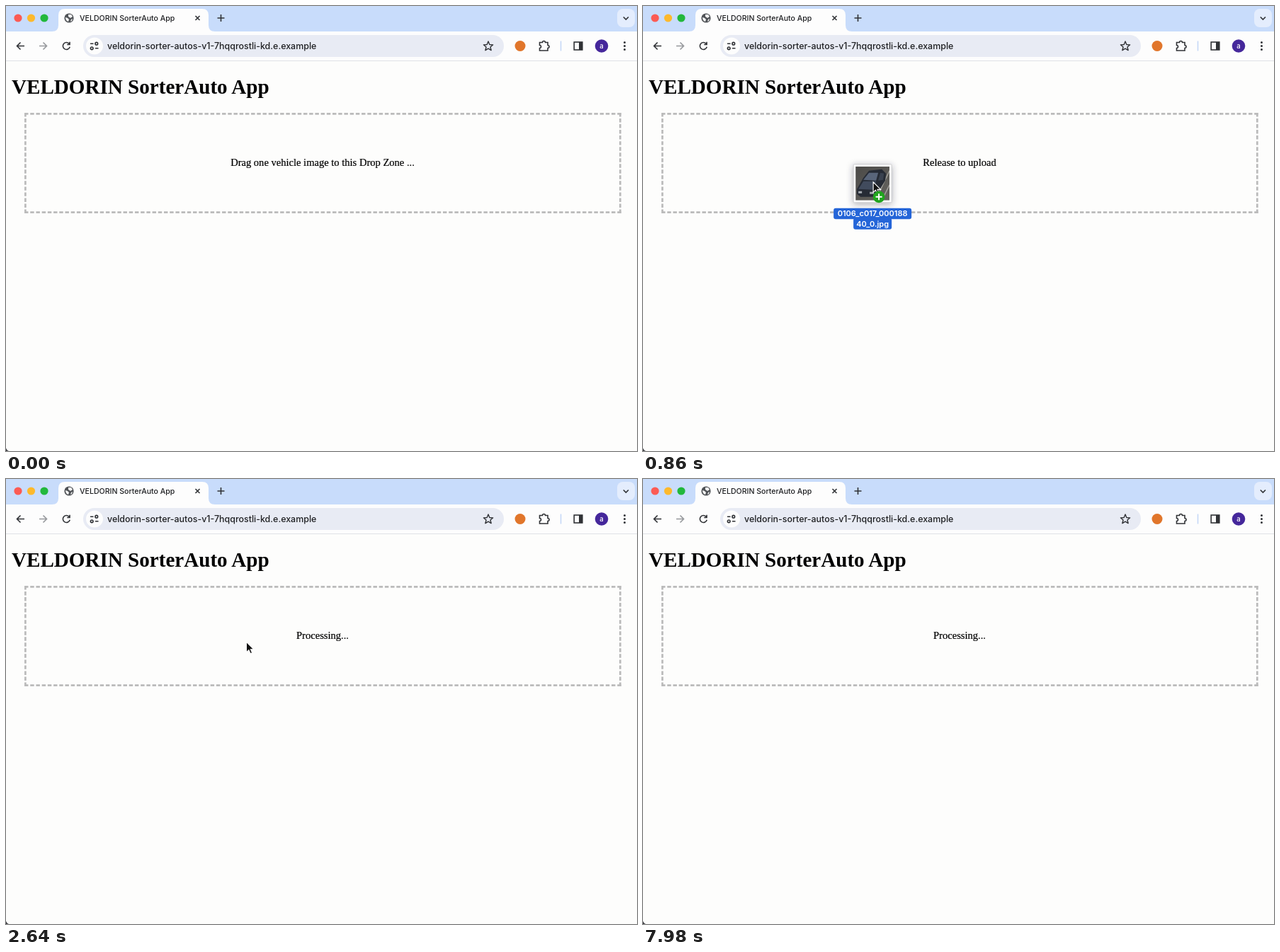
Write an HTML page that moves like this. It is 891 by 629 pixels and loops after 8 s.

```html
<!DOCTYPE html>
<html lang="en">
<head>
<meta charset="utf-8">
<title>Drop zone demo</title>
<style>
  html, body { margin: 0; width: 100%; height: 100%; overflow: hidden; background: #fdfdfc; }
  svg { position: absolute; left: 0; top: 0; display: block; }
  .ui { font-family: Inter, Roboto, sans-serif; font-weight: 500; }
  .page { font-family: "Liberation Serif", "Times New Roman", serif; }
  .icon { fill: none; stroke: #303236; stroke-width: 1.6; }
  .label { font-weight: 600; font-size: 11px; fill: #fff; text-anchor: middle; }
  #status { font-size: 14.56px; text-anchor: middle; stroke: #000; stroke-width: .2; }
  /* The page is shown at 91% zoom. */
  #zone {
    position: absolute; left: 25.5px; top: 151px; width: 926px; height: 156px;
    box-sizing: border-box; border: 3px dashed #bbb;
    transform: scale(.91); transform-origin: 0 0;
  }
</style>
</head>
<body>
<div id="zone"></div>
<svg width="891" height="629" viewBox="0 0 891 629">
  <defs>
    <filter id="shadow" x="-50%" y="-50%" width="200%" height="200%">
      <feDropShadow dx="0" dy="2" stdDeviation="5" flood-color="#334" flood-opacity=".4"/>
    </filter>
    <linearGradient id="road" x2="1" y2="1">
      <stop stop-color="#4b4a48"/><stop offset="1" stop-color="#66645f"/>
    </linearGradient>
    <clipPath id="photo"><rect x="-24" y="-24" width="48" height="48"/></clipPath>
  </defs>

  <!-- Tab strip -->
  <rect width="891" height="36" fill="#c8dcfb"/>
  <circle cx="17" cy="17" r="5.6" fill="#fc5b54"/>
  <circle cx="35.5" cy="17" r="5.6" fill="#fdb92c"/>
  <circle cx="54" cy="17" r="5.6" fill="#22b83c"/>
  <path d="M65 36q9 0 9-9V13q0-9 9-9H277q9 0 9 9V27q0 9 9 9Z" fill="#fdfdfd"/>
  <circle cx="89" cy="17" r="6.6" fill="#505357"/>
  <path d="M84 16l3 1 2 2-1 3q-4-1-4-6ZM88 12l4 0 2 3-3 2-3-2ZM92 19l2-1-1 3-2 1Z" fill="#f4f4f4"/>
  <text class="ui" x="104" y="21" font-size="10.6" fill="#1f2023">VELDORIN SorterAuto App</text>
  <g class="icon">
    <path d="M267.5 14l6 6m0-6l-6 6"/>
    <path d="M298.5 17h10m-5-5v10"/>
  </g>
  <rect x="863" y="4" width="25" height="26" rx="8" fill="#e4edfd"/>
  <path class="icon" d="M871.8 15.5l3.6 3.6 3.6-3.6"/>

  <!-- Toolbar -->
  <rect y="36" width="891" height="41" fill="#fdfdfd"/>
  <path d="M0 77.5H891" stroke="#dfe1e6"/>
  <rect x="109" y="41" width="594" height="31" rx="15.5" fill="#e8ebf4"/>
  <circle cx="125" cy="56.5" r="12" fill="#fdfdfd"/>
  <g class="icon">
    <path d="M26 56.5H15.5m5-5l-5 5 5 5"/>
    <path d="M47 56.5H57.5m-5-5l5 5-5 5" stroke="#96989c"/>
    <path d="M89.4 53.5a5 5 0 1 0 .8 4.2M90 50.8v3.7h-3.8"/>
    <path d="M119 53.2h4.5M126 59.8h4.5"/>
    <circle cx="127.8" cy="53.2" r="1.8"/>
    <circle cx="121.2" cy="59.8" r="1.8"/>
    <path id="star" stroke-width="1.4" stroke-linejoin="round"/>
    <path d="M753.5 51.5h4a2 2 0 0 1 4 0h3.5v4a2 2 0 0 1 0 4v3.5H753.5v-3.5a2 2 0 0 0 0-4Z"/>
    <rect x="802.2" y="51" width="11.6" height="11"/>
  </g>
  <rect x="809" y="51" width="5" height="11" fill="#303236"/>
  <text class="ui" x="143" y="61" font-size="12.45" fill="#1f2023">veldorin-sorter-autos-v1-7hqqrostli-kd.e.example</text>
  <circle cx="726" cy="56.5" r="7.5" fill="#e1762b"/>
  <path d="M783.5 49.5v14" stroke="#c6d9f7" stroke-width="1.6"/>
  <circle cx="841" cy="56.5" r="9.3" fill="#45279b"/>
  <text class="ui" x="841" y="60" font-size="9.5" fill="#fff" text-anchor="middle">a</text>
  <g fill="#303236">
    <circle cx="873.5" cy="51.5" r="1.5"/><circle cx="873.5" cy="56.5" r="1.5"/><circle cx="873.5" cy="61.5" r="1.5"/>
  </g>

  <!-- Page -->
  <text class="page" x="8" y="124" font-size="29.1" font-weight="700">VELDORIN SorterAuto App</text>
  <text id="status" class="page" x="447" y="226"></text>
  <path d="M0 625v4h4q-3-1-4-4Z" fill="#35373c"/>

  <!-- Dragged file, centred on its thumbnail -->
  <g id="file">
    <rect x="-27" y="-27" width="54" height="54" rx="1" fill="#fff" stroke="#bfc0c4" stroke-width=".8" filter="url(#shadow)"/>
    <g clip-path="url(#photo)">
      <rect x="-24" y="-24" width="48" height="48" fill="url(#road)"/>
      <path d="M24-18L4 24M24 2L13 24" stroke="#a3a29c" stroke-width="1.5"/>
      <path d="M-22 8L-13-8-5-18 13-20 19-14 18-4 7 13 3 19-17 19-22 15Z" fill="#262b35"/>
      <path d="M-13-5L-5-15 8-15 5-4Z" fill="#59657a"/>
      <path d="M-20 8L-13-3 5-3 2 9Z" fill="#414b5d"/>
      <path d="M8-4L11-15 16-14 15-5Z" fill="#3a4250"/>
      <path d="M-20 11h5v3h-5ZM-4 12h6v3h-6Z" fill="#a7acb2"/>
    </g>
    <rect x="-55" y="35" width="110" height="15.5" rx="3" fill="#2465d8"/>
    <rect x="-27" y="49" width="54" height="16" rx="3" fill="#2465d8"/>
    <text class="ui label" y="46.7">0106_c017_000188</text>
    <text class="ui label" y="61.2">40_0.jpg</text>
  </g>

  <!-- Pointer, origin at its tip -->
  <g id="pointer">
    <path d="M0 0V14.5L3.4 11.4 5.7 16.5 8.2 15.4 6 10.5H10.5Z" fill="#111" stroke="#fff" stroke-width="1.1"/>
    <g id="badge">
      <circle cx="8" cy="21" r="8.3" fill="#20a51d"/>
      <path d="M3.5 21h9M8 16.5v9" stroke="#fff" stroke-width="2"/>
    </g>
  </g>
</svg>
<script>
const LOOP = 8000, ENTER = 120, OVER_ZONE = 790, DROP = 2000, LEAVE = 3100;

// time, x, y
const pointerPath = [
  [120, -46, 500], [400, 112, 452], [680, 261, 358], [860, 325, 249],
  [1000, 338, 230], [1400, 340, 230], [2640, 340, 230], [2860, 220, 300], [3100, -14, 395]
];
const filePath = [
  [120, -60, 502], [400, 92, 460], [680, 247, 372], [860, 324, 251],
  [1000, 343, 222], [1400, 345, 222]
];

const $ = id => document.getElementById(id);

function positionAt(path, t) {
  const next = path.findIndex(step => step[0] > t);
  if (next < 0) return path[path.length - 1].slice(1);
  if (next === 0) return path[0].slice(1);
  const [t0, x0, y0] = path[next - 1], [t1, x1, y1] = path[next];
  const k = (t - t0) / (t1 - t0);
  return [x0 + (x1 - x0) * k, y0 + (y1 - y0) * k];
}

function place(node, path, t, visible) {
  node.style.display = visible ? "" : "none";
  if (visible) node.setAttribute("transform", `translate(${positionAt(path, t)})`);
}

function statusAt(t) {
  if (t < OVER_ZONE) return "Drag one vehicle image to this Drop Zone ...";
  return t < DROP ? "Release to upload" : "Processing...";
}

function starPath(cx, cy, outer, inner) {
  const points = Array.from({ length: 10 }, (_, i) => {
    const r = i % 2 ? inner : outer, a = (i / 5 - 0.5) * Math.PI;
    return `${cx + r * Math.cos(a)} ${cy + r * Math.sin(a)}`;
  });
  return `M${points.join("L")}Z`;
}

function render(t) {
  const dragging = t >= ENTER && t < DROP;
  place($("file"), filePath, t, dragging);
  place($("pointer"), pointerPath, t, t >= ENTER && t < LEAVE);
  $("badge").style.display = dragging ? "" : "none";
  const text = statusAt(t);
  if ($("status").textContent !== text) $("status").textContent = text;
}

$("star").setAttribute("d", starPath(681, 57, 7, 3.1));
render(0);
const start = performance.now();
requestAnimationFrame(function tick(now) {
  render(Math.max(0, now - start) % LOOP);
  requestAnimationFrame(tick);
});
</script>
</body>
</html>
```
